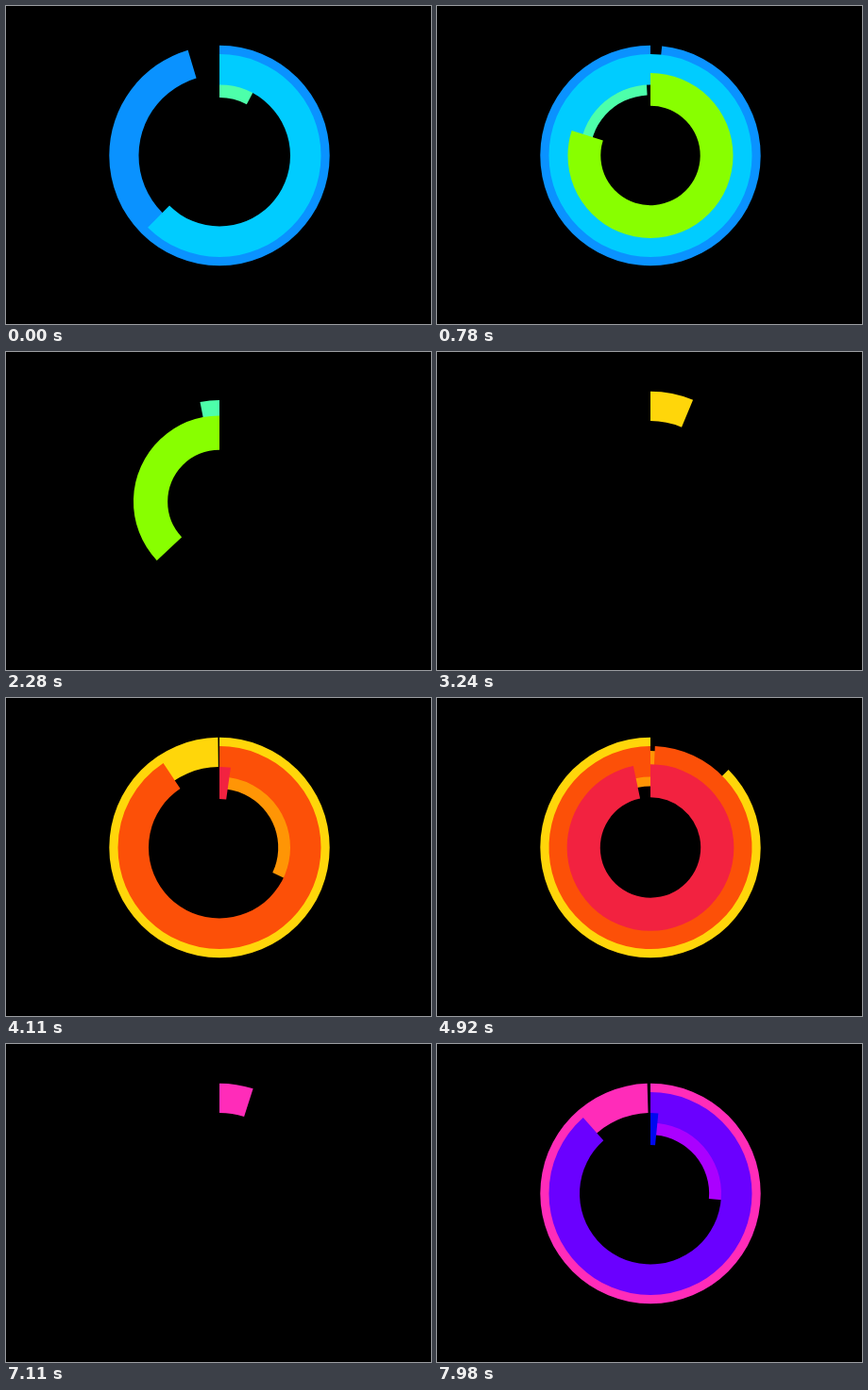
These frames come from a looping animation (450x337 px, 8000 ms). An HTML page with a canvas:

```html
<!DOCTYPE html>
<html lang="en">
<head>
<meta charset="utf-8">
<title>Ring sweep</title>
<style>
html, body { margin: 0; width: 100%; height: 100%; overflow: hidden; background: #000; }
canvas { display: block; width: 450px; height: 337px; }
</style>
</head>
<body>
<canvas id="stage" width="450" height="337"></canvas>
<script>
const ctx = document.getElementById('stage').getContext('2d');
const LOOP = 8000, CYCLE = 3900, OFFSET = 660, LEAD = 330;
const CX = 226, CY = 158.5;
const HEAD_MS = 1254, TAIL_MS = 1300;

// Back to front. head and tail: midpoint of each sweep, in ms.
// grow: radius scale gained per ms after `from`, up to `max`.
const RINGS = [
  { slot: 0, inner: 85.5, outer: 116.7, head: 312, tail: 1906 },
  { slot: 2, inner: 61.5, outer: 97, head: 945, tail: 2533, from: 660, grow: 0.0000565, max: 1.108 },
  { slot: 1, inner: 75, outer: 107.5, head: 612, tail: 2206 },
  { slot: 3, inner: 51.5, outer: 85.5, head: 1295, tail: 2888, from: 870, grow: 0.000041, max: 1.065 }
];

const PALETTES = [
  ['#0a92ff', '#00ccff', '#4dffaa', '#88ff00'],
  ['#ffd60a', '#fc5008', '#ff9505', '#f22240'],
  ['#ff2cb9', '#6a00ff', '#aa00ff', '#0008f0']
];

// Symmetric ease: cubic-bezier(.7, 0, .3, 1)
function ease(x) {
  if (x <= 0) return 0;
  if (x >= 1) return 1;
  let lo = 0, hi = 1;
  for (let i = 0; i < 24; i++) {
    const u = (lo + hi) / 2, v = 1 - u;
    if (2.1 * u * v * v + 0.9 * u * u * v + u * u * u < x) lo = u;
    else hi = u;
  }
  return lo * lo * (3 - 2 * lo);
}

const sweep = (time, mid, span) => ease((time - mid) / span + 0.5);

function drawRing(ring, time, colors) {
  const start = sweep(time, ring.tail, TAIL_MS);
  const end = sweep(time, ring.head, HEAD_MS);
  if (end - start < 0.0002) return;
  const scale = ring.grow
    ? Math.min(ring.max, 1 + Math.max(0, time - ring.from) * ring.grow)
    : 1;
  const a = (start - 0.25) * 2 * Math.PI;
  const b = (end - 0.25) * 2 * Math.PI;
  ctx.beginPath();
  ctx.arc(CX, CY, ring.outer * scale, a, b);
  ctx.arc(CX, CY, ring.inner * scale, b, a, true);
  ctx.closePath();
  ctx.fillStyle = colors[ring.slot];
  ctx.fill();
}

function draw(ms) {
  const shifted = ms + OFFSET + LEAD;
  const time = shifted % CYCLE - LEAD;
  const colors = PALETTES[Math.floor(shifted / CYCLE) % PALETTES.length];
  ctx.fillStyle = '#000';
  ctx.fillRect(0, 0, 450, 337);
  for (const ring of RINGS) drawRing(ring, time, colors);
}

const began = performance.now();
function tick() {
  draw((performance.now() - began) % LOOP);
  requestAnimationFrame(tick);
}
tick();
</script>
</body>
</html>
```
